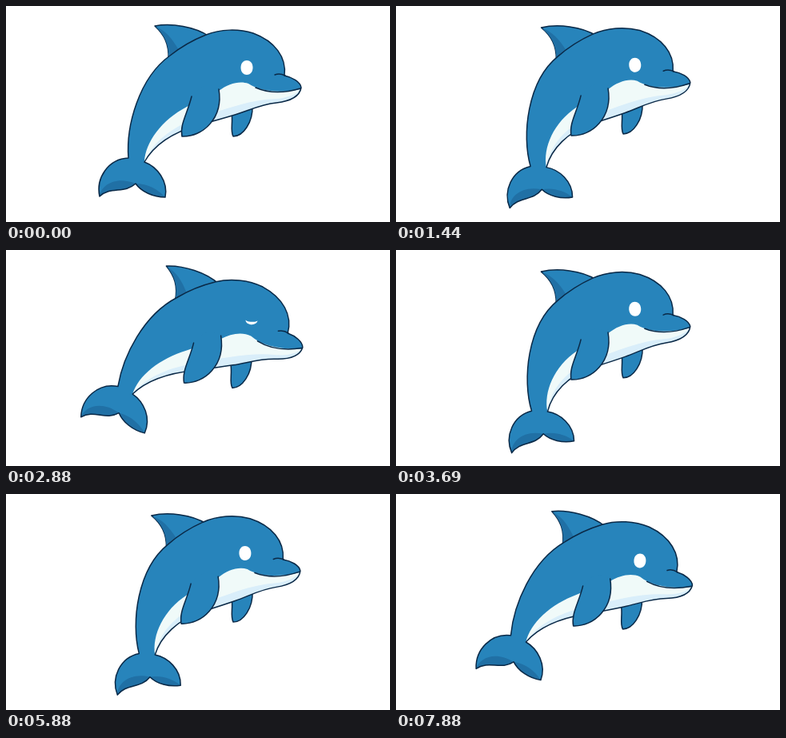
These frames come from a looping animation (480 by 270 pixels, 7950 ms). An HTML page:

```html
<!DOCTYPE html>
<html lang="en">
<head>
<meta charset="utf-8">
<title>Dolphin</title>
<style>
  html, body { margin: 0; width: 100%; height: 100%; overflow: hidden; background: #fff; }
  svg { display: block; width: 480px; height: 270px; }
</style>
</head>
<body>
<svg id="stage" viewBox="0 0 480 270" stroke-linejoin="round" stroke-linecap="round"></svg>
<script>
const LOOP = 7950;
const BLUE = '#2784bb', SHADE = '#2070a5', INK = '#0a2947';
const CENTER = [229, 125];
const REST = 0.44;

// Swim cycle: time and how far the body is stretched out (0 = curled).
const SWIM = [
  [0, 0.44], [830, 1.25], [1460, 0], [2500, 1.2], [2880, 1], [3250, 1.25],
  [3720, -0.05], [4370, 1.25], [4850, -0.05], [5380, 1.25], [5860, 0.05],
  [6700, 1.25], [7370, 0.12], [7900, 0.83], [LOOP, 0.83]
];
const BLINK = [2700, 2830, 2940, 3070];

const UNDERSIDE = `C367,113 355,119 338,121 C318,123 303,131 286,136
  C270,141 255,145 240,149 C212,157 186,172 173,195`;
const BODY = `M250,36 C268,29 290,28 309,34 C336,44 351,64 348,87
  C358,89 368,95 369,102 ${UNDERSIDE} C189,201 203,219 199,239
  C184,239 169,232 162,222 C148,235 131,225 117,238
  C112,215 128,191 153,190 C150,150 166,90 205,62 C220,50 235,42 250,36 Z`;

// Each part: path, fill, stroke, anchor (parts with an anchor shift without turning).
const PARTS = [
  ['M203,66 C204,48 198,36 186,25 C207,21 237,26 254,38 Z', BLUE, INK],
  ['M203,65 C204,48 198,36 187,26 C199,30 208,41 216,55 Z', SHADE],
  ['M282,134 C284,145 280,156 284,163 C296,163 309,146 308,124 Z', BLUE, INK, [297, 128]],
  [BODY, BLUE],
  ['M117,238 C119,223 138,212 162,222 C148,235 131,225 117,238 Z', SHADE],
  ['M162,222 C177,222 190,229 199,239 C184,239 169,232 162,222 Z', SHADE],
  [`M173,195 C174,170 195,142 226,126 C245,116 258,112 266,106
    C278,97 292,93 303,97 C318,107 342,109 369,104 ${UNDERSIDE} Z`, '#f0faf9'],
  [`M173,195 C184,168 212,149 240,140 C276,128 306,117 338,116
    C352,115 363,110 369,104 ${UNDERSIDE} Z`, '#d9eefa'],
  [BODY, 'none', INK],
  ['M312,102 C328,109 348,109 368,103', 'none', INK],
  ['M336,86 C341,84 345,85 349,87', 'none', INK],
  ['M232,113 C227,134 217,148 220,163 C246,164 272,140 266,104 C255,96 242,98 232,113 Z', BLUE, 'none', [250, 105]],
  ['M232,113 C227,134 217,148 220,163 C246,164 272,140 266,104', 'none', INK, [250, 105]],
];

const stage = document.getElementById('stage');
function addPath(fill, stroke = 'none') {
  const el = document.createElementNS('http://www.w3.org/2000/svg', 'path');
  el.setAttribute('fill', fill);
  el.setAttribute('stroke', stroke);
  el.setAttribute('stroke-width', 1.5);
  return stage.appendChild(el);
}
const paths = PARTS.map(([, fill, stroke]) => addPath(fill, stroke));
const eye = addPath('#fff');

const clamp = v => Math.max(0, Math.min(1, v));
const smooth = v => (v = clamp(v), v * v * (3 - 2 * v));
const mix = (a, b, k) => a + (b - a) * k;

function stretchAt(t) {
  const i = SWIM.findIndex(key => key[0] > t);
  const [t0, a] = SWIM[i - 1], [t1, b] = SWIM[i];
  return mix(a, b, (1 - Math.cos(Math.PI * (t - t0) / (t1 - t0))) / 2);
}

// Turns a point around the body centre, the tail more than the head.
function bend(x, y, u) {
  const tail = smooth((y - 0.7 * (x - 160) - 60) / 130);
  const angle = mix(0.167 * u + 0.148 * u * u, 0.42 * u, tail);
  const scale = 1 + 0.07 * Math.min(u, 0) * tail;
  const dx = (x - CENTER[0]) * scale, dy = (y - CENTER[1]) * scale;
  const c = Math.cos(angle), s = Math.sin(angle);
  return [CENTER[0] + dx * c - dy * s, CENTER[1] + dx * s + dy * c];
}

function warp(d, u, anchor) {
  const root = anchor && bend(...anchor, u);
  return d.replace(/(\d+),(\d+)/g, (_, x, y) => {
    const p = anchor
      ? [+x + root[0] - anchor[0], +y + root[1] - anchor[1]]
      : bend(+x, +y, u);
    return p.map(v => v.toFixed(2)).join();
  });
}

function draw(now) {
  const t = now % LOOP;
  const u = stretchAt(t) - REST;
  PARTS.forEach(([d, , , anchor], i) => paths[i].setAttribute('d', warp(d, u, anchor)));

  const [b0, b1, b2, b3] = BLINK;
  const shut = smooth((t - b0) / (b1 - b0)) - smooth((t - b2) / (b3 - b2));
  const top = mix(-12, 3, shut), bottom = mix(12, 7.5, shut);
  const [x, y] = bend(301, 77, u);
  eye.setAttribute('d', `M-7.5,0 C-7.5,${top} 7.5,${top} 7.5,0 C7.5,${bottom} -7.5,${bottom} -7.5,0 Z`);
  eye.setAttribute('transform', `translate(${x} ${y}) rotate(${8 * u})`);
  requestAnimationFrame(draw);
}
const start = performance.now();
requestAnimationFrame(function first() {
  draw(0);
  const tick = draw;
  draw = () => { tick(performance.now() - start); };
});
</script>
</body>
</html>
```
